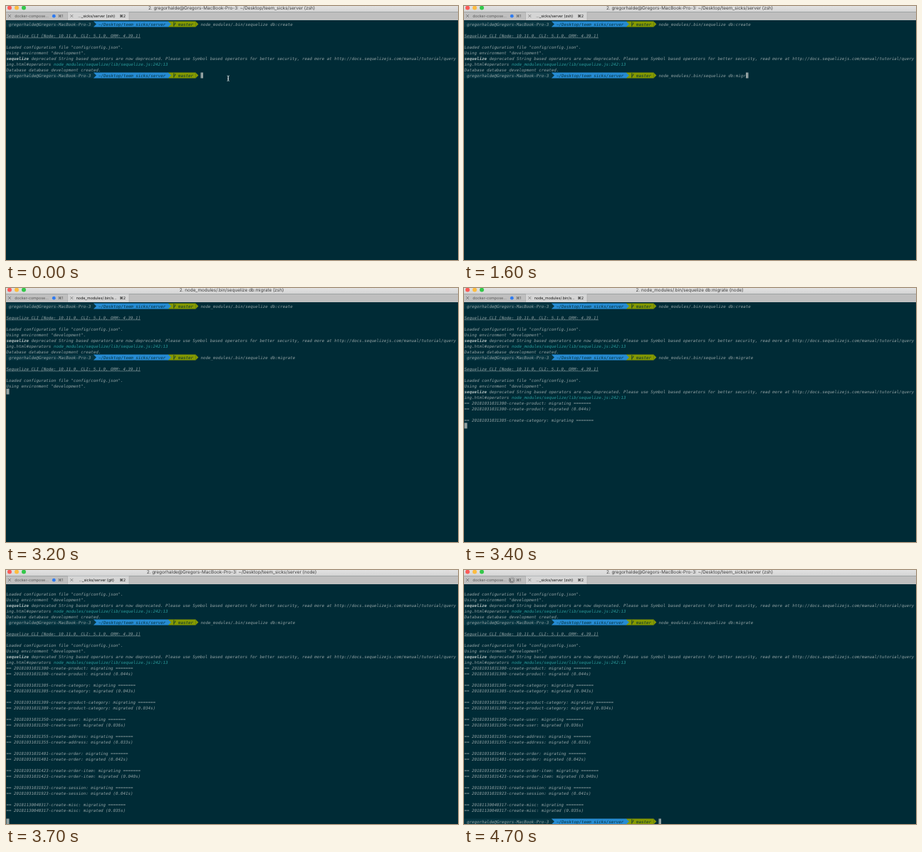
Recreate the animation shown at these times as an HTML page. Size 635 px wide and 357 px high, loop 4800 ms.

```html
<!DOCTYPE html>
<html lang="en">
<head>
<meta charset="utf-8">
<title>Terminal</title>
<style>
html, body { margin: 0; width: 100%; height: 100%; overflow: hidden; background: #002b36; }
svg { display: block; width: 635px; height: 357px; }
text { white-space: pre; text-rendering: geometricPrecision; }
.mono { font: italic 5.814px "DejaVu Sans Mono", monospace; fill: #92a2a4; }
.ui { font: 5.34px Inter, sans-serif; text-anchor: middle; }
.title { font-size: 6.36px; fill: #3c3c3c; }
.bold { font-weight: bold; fill: #b4c0c0; }
.link { fill: #2b9c9c; }
.dark { fill: #053039; }
.under { text-decoration: underline; }
</style>
</head>
<body>
<svg viewBox="0 0 635 357" xmlns="http://www.w3.org/2000/svg">
  <defs>
    <linearGradient id="bar" x2="0" y2="1">
      <stop offset="0" stop-color="#e2e2e2"/><stop offset="1" stop-color="#d3d3d3"/>
    </linearGradient>
  </defs>
  <rect width="635" height="357" fill="#002b36"/>
  <g id="screen"></g>
  <rect width="635" height="8.5" fill="url(#bar)"/>
  <rect y="8.5" width="635" height="11.5" fill="#bfbfbf"/>
  <rect x="86.5" y="8.5" width="86.5" height="11.5" fill="#d5d5d5"/>
  <path d="M0 8.5H86.5M173 8.5H635M86.5 8.5V20M173 8.5V20" stroke="#a6a6a6" stroke-width=".6" fill="none"/>
  <circle cx="5" cy="2.6" r="3" fill="#fc5b57"/>
  <circle cx="15" cy="2.6" r="3" fill="#fdbc40"/>
  <circle cx="25" cy="2.6" r="3" fill="#34c84a"/>
  <path d="M3 12l4 4m0-4l-4 4M90.300 12l4 4m0-4l-4 4" stroke="#6a6a6a" stroke-width=".7"/>
  <text id="title" class="ui title" x="317" y="5.200"></text>
  <text class="ui" x="36" y="16" fill="#555">docker-compose…</text>
  <text class="ui" x="76.700" y="16" fill="#555">⌘1</text>
  <text id="tab" class="ui" x="127.200" y="16" fill="#111"></text>
  <text class="ui" x="163.700" y="16" fill="#111">⌘2</text>
  <circle id="dot" cx="67.300" cy="14.200" r="2.400" fill="#2f7bf0"/>
  <g id="spinner"></g>
  <path id="mouse" d="M310.600 98q1.600 0 1.600 1v5.400q0 1-1.600 1M313.800 98q-1.600 0-1.600 1v5.400q0 1 1.600 1M311.300 102.200h1.800" stroke="#d5dcdd" stroke-width=".8" fill="none"/>
</svg>
<script>
const LOOP = 4800, STEP = 100;
const CW = 3.5, LH = 8, LEFT = 0.5, TOP = 21.5, ROWS = 42;
const USER = 'gregorhalde@Gregors-MacBook-Pro-3';
const DIR = '~/Desktop/teem_sicks/server';
const RUN = 'node_modules/.bin/sequelize db:';
const CMD_COL = 78;
const START = 3320;

const $ = id => document.getElementById(id);
const colX = c => LEFT + c * CW;
const rowY = r => TOP + r * LH;

const span = (row, col, str, cls = '') =>
  `<text class="mono ${cls}" x="${colX(col)}" y="${rowY(row) + 6.1}">${str}</text>`;
const block = (row, from, to, fill) =>
  `<rect x="${from ? colX(from) : 0}" y="${rowY(row)}" width="${colX(to) - (from ? colX(from) : 0)}" height="${LH}" fill="${fill}"/>`;
const arrow = (row, col, fill) =>
  `<path d="M${colX(col) - 0.1} ${rowY(row)}l4 4l-4 4z" fill="${fill}"/>`;

// A line is a function of its row on the screen.
const plain = (str, cls) => r => span(r, 0, str, cls);
const blank = () => '';

const prompt = cmd => r =>
  block(r, 0, 35, '#073642') + block(r, 35, 65, '#268bd2') + block(r, 65, 76, '#859900') +
  arrow(r, 35, '#073642') + arrow(r, 65, '#268bd2') + arrow(r, 76, '#859900') +
  `<path d="M${colX(67) + 0.8} ${rowY(r) + 0.8}v6.400m0-1.800q2.200-.6 2.200-3.600" stroke="#053039" stroke-width=".8" fill="none"/>` +
  span(r, 1, USER) + span(r, 37, DIR, 'dark') + span(r, 69, 'master', 'dark') +
  span(r, CMD_COL, cmd);

const header = [
  blank,
  plain('Sequelize CLI [Node: 10.11.0, CLI: 5.1.0, ORM: 4.39.1]', 'under'),
  blank,
  plain('Loaded configuration file "config/config.json".'),
  plain('Using environment "development".')
];
const warning = [
  r => span(r, 0, 'sequelize', 'bold') + span(r, 10,
    'deprecated String based operators are now deprecated. Please use Symbol based operators for better security, read more at http://docs.sequelizejs.com/manual/tutorial/query'),
  r => span(r, 0, 'ing.html#operators') +
    span(r, 19, 'node_modules/sequelize/lib/sequelize.js:242:13', 'link')
];
const migrations = [
  ['20181031031300-create-product', 44],
  ['20181031031305-create-category', 43],
  ['20181031031309-create-product-category', 34],
  ['20181031031350-create-user', 36],
  ['20181031031355-create-address', 33],
  ['20181031031401-create-order', 42],
  ['20181031031423-create-order-item', 40],
  ['20181031031923-create-session', 41],
  ['20181130040317-create-misc', 35]
];

function migrationLines(t) {
  const out = [];
  let at = START;
  for (const [name, ms] of migrations) {
    if (t < at) break;
    out.push(plain(`== ${name}: migrating =======`));
    at += ms;
    if (t < at) break;
    out.push(plain(`== ${name}: migrated (0.0${ms}s)`), blank);
  }
  return out;
}

function command(t) {
  if (t < 300) return '';
  if (t < 1300) return RUN + 'create';
  if (t < 1800) return RUN + 'migrat'.slice(0, [0, 1, 3, 4, 6][(t - 1300) / STEP]);
  return RUN + 'migrate' + (t < 1900 ? ' ' : '');
}

function drawScreen(t) {
  const cmd = command(t);
  const lines = [prompt(RUN + 'create'), ...header, ...warning,
    plain('Database database_development created.'), prompt(cmd)];
  let row = lines.length - 1, col = CMD_COL + cmd.length;
  if (t >= 2600) {
    if (t >= 3200) lines.push(...header);
    if (t >= 3300) lines.push(...warning);
    lines.push(...migrationLines(t));
    row = lines.length;
    col = 0;
    if (t >= 3900) {
      lines.push(prompt(''));
      col = CMD_COL;
    }
  }
  const scroll = Math.max(0, row - ROWS + 1);
  $('screen').innerHTML = lines.slice(scroll).map((line, r) => line(r)).join('') +
    block(row - scroll, col, col + 1, '#93a1a1').replace('x="0" ', 'x="0.5" ');
}

function drawBars(t) {
  const busy = t >= 2700 && t < 3700;
  const job = t < 3300 || t >= 3900 ? 'zsh' : t < 3800 ? 'node' : 'git';
  $('title').textContent = `2. ${busy ? RUN + 'migrate' : USER + ': ' + DIR} (${job})`;
  $('tab').textContent = busy ? 'node_modules/.bin/s…'
    : `…_sicks/server (${t >= 3700 && t < 3900 ? 'git' : 'zsh'})`;
}

function drawSpinner(t) {
  const on = t >= 4400;
  $('dot').style.display = on ? 'none' : '';
  let out = '';
  for (let i = 0; on && i < 12; i++) {
    const age = (i - t / STEP % 12 + 24) % 12;
    out += `<path d="M0-2v-2.200" transform="translate(67.300 14.200) rotate(${i * 30})" stroke="#333" stroke-width=".8" stroke-linecap="round" opacity="${0.25 + age / 16}"/>`;
  }
  $('spinner').innerHTML = out;
}

let shown = -1;
function render(ms) {
  const t = Math.floor(ms % LOOP / STEP) * STEP;
  if (t !== shown) {
    shown = t;
    drawScreen(t);
    drawBars(t);
    drawSpinner(t);
    $('mouse').style.display = t < 300 ? '' : 'none';
  }
}

let origin;
function tick(now) {
  origin ??= now;
  render(now - origin);
  requestAnimationFrame(tick);
}
render(0);
requestAnimationFrame(tick);
</script>
</body>
</html>
```
